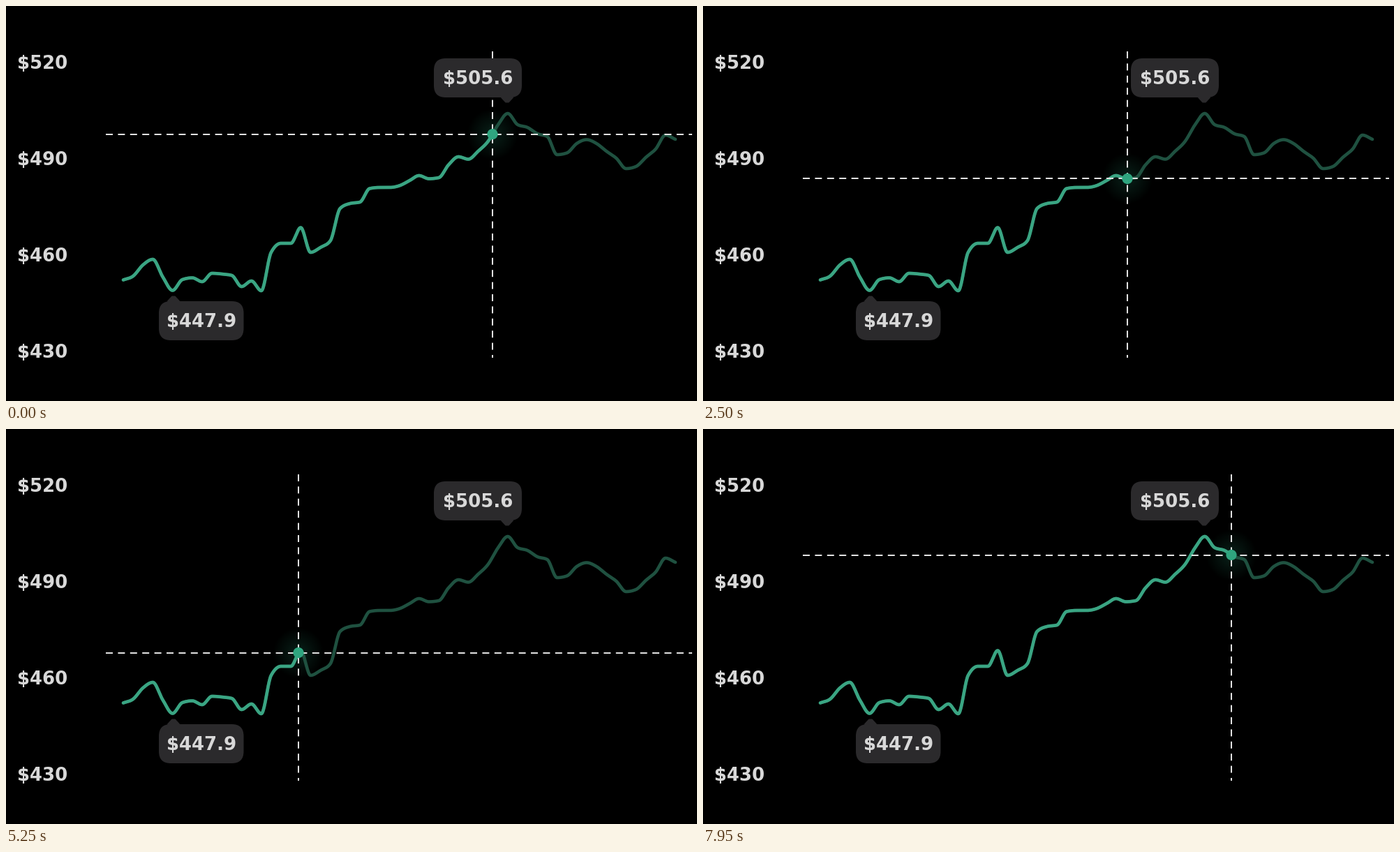
These frames come from a looping animation (990 by 566 pixels, 8 s). A matplotlib script:

```python
import matplotlib.pyplot as plt
import numpy as np
from matplotlib.animation import FuncAnimation
from matplotlib.patches import Circle, FancyBboxPatch, Polygon

W, H, DPI = 990, 566, 100
STEP, LOOP = 50, 8000
PX = 72 / DPI

GREEN, DIM = "#3aa583", "#1f5140"
INK, BUBBLE = "#d8d8d8", "#2b2a2c"


def slopes(x, y):
    """Monotone tangents: flat at every peak and valley."""
    h = np.diff(x)
    d = np.diff(y) / h
    m = np.empty(len(x))
    m[0], m[-1] = d[0], d[-1]
    a, b = d[:-1], d[1:]
    mean = (h[1:] * a + h[:-1] * b) / (h[1:] + h[:-1])
    limit = np.minimum(2 * np.minimum(abs(a), abs(b)), abs(mean))
    m[1:-1] = np.where(a * b > 0, np.sign(a) * limit, 0)
    return m


def smooth(x, y):
    x, y = np.array(x, float), np.array(y, float)
    m = slopes(x, y)

    def at(q):
        i = np.clip(np.searchsorted(x, q, side="right") - 1, 0, len(x) - 2)
        h = x[i + 1] - x[i]
        s = (q - x[i]) / h
        return (y[i] * (1 + 2 * s) * (1 - s) ** 2
                + y[i + 1] * s * s * (3 - 2 * s)
                + h * s * (1 - s) * (m[i] * (1 - s) - m[i + 1] * s))

    return at


# Price line, one height per evenly spaced sample
heights = [392.5, 387, 371, 363, 388, 407.5, 392, 389.5, 395, 383, 384, 386,
           402, 394, 408, 353, 340, 340, 317.5, 353, 346, 336.5, 290, 283,
           281, 261.5, 260, 260, 257.5, 250.5, 243, 247.5, 246, 227.5, 216,
           219.5, 208, 194, 170.5, 154, 170, 174, 183, 187, 213, 210.5, 197,
           191.5, 197, 208, 218, 233, 230, 217, 205, 185, 191]
price = smooth(np.linspace(168, 959, len(heights)), heights)
xs = np.linspace(168, 959, 1200)
ys = price(xs)

# Cursor sweep: time in ms, x in px
cursor = smooth([-400, 0, 950, 1350, 2500, 3700, 4000, 5250, 6350, 6550, 7950, 8400],
                [800, 697, 449, 405, 608, 862, 841, 419, 223, 217, 757, 850])

fig = plt.figure(figsize=(W / DPI, H / DPI), dpi=DPI, facecolor="black")
ax = fig.add_axes([0, 0, 1, 1])

# Soft halo around the cursor dot
R = 38
g = np.linspace(-1, 1, 2 * R)
halo = np.zeros((2 * R, 2 * R, 4))
halo[..., :3] = 0.18, 0.65, 0.5
halo[..., 3] = 0.2 * np.clip(1 - np.hypot(*np.meshgrid(g, g)), 0, 1)
glow = ax.imshow(halo, aspect="auto", zorder=1)

ax.set_xlim(0, W)
ax.set_ylim(H, 0)
ax.axis("off")


def stroke(color, z):
    return ax.plot([], [], color=color, lw=4.6 * PX, zorder=z,
                   solid_capstyle="round", solid_joinstyle="round")[0]


def dashed():
    return ax.plot([], [], color="#e2e2e2", lw=2 * PX, zorder=4,
                   linestyle=(0, (5, 3.7)), dash_capstyle="butt")[0]


def label(x, base, text, ha):
    ax.text(x, base, text, color=INK, family="DejaVu Sans", weight="bold",
            size=26 * PX, ha=ha, va="baseline", zorder=8)


def bubble(x0, y0, x1, y1, tip_x, tip_y, text):
    r = 17
    ax.add_patch(FancyBboxPatch((x0 + r, y0 + r), x1 - x0 - 2 * r, y1 - y0 - 2 * r,
                                boxstyle=f"round,pad={r}", fc=BUBBLE, ec="none",
                                zorder=6))
    edge = y1 if tip_y > y1 else y0
    tip = tip_y - np.sign(tip_y - edge) * 1.5
    ax.add_patch(Polygon([(tip_x - 8, edge), (tip_x - 2, tip), (tip_x + 2, tip),
                          (tip_x + 8, edge)], fc=BUBBLE, ec=BUBBLE, lw=2 * PX,
                         joinstyle="round", zorder=6))
    label((x0 + x1) / 2, y0 + 37, text, "center")


stroke(DIM, 2).set_data(xs, ys)
trail = stroke(GREEN, 3)
across, down = dashed(), dashed()
dot = ax.add_patch(Circle((0, 0), 7.6, fc="#2fa57f", ec="none", zorder=5))

for value, base in zip((520, 490, 460, 430), (89.5, 227.5, 366.5, 504.5)):
    label(16, base, f"${value}", "left")
bubble(613, 75, 739, 131, 718, 139, "$505.6")
bubble(219, 423, 340.5, 479, 240, 415, "$447.9")


def draw(frame):
    x = float(cursor(frame * STEP))
    y = float(price(x))
    past = xs < x
    trail.set_data(np.append(xs[past], x), np.append(ys[past], y))
    across.set_data([143, 983], [y, y])
    down.set_data([x, x], [65, 504])
    dot.center = x, y
    glow.set_extent((x - R, x + R, y + R, y - R))
    ax.set_xlim(0, W)
    ax.set_ylim(H, 0)
    return glow, trail, across, down, dot


anim = FuncAnimation(fig, draw, frames=LOOP // STEP, interval=STEP,
                     repeat=True, repeat_delay=0, blit=False)
plt.show()
```
